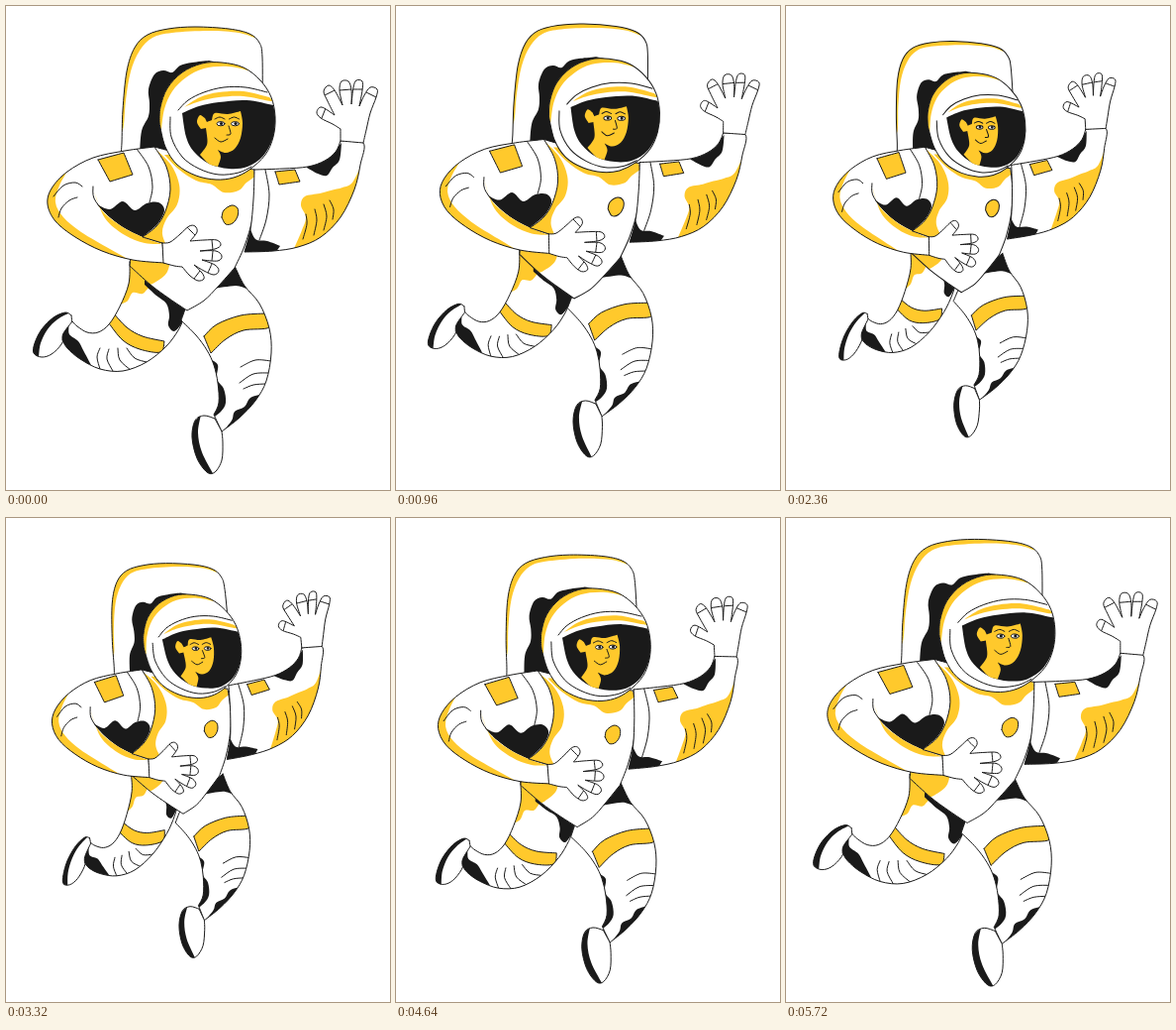
Recreate the animation shown at these times as an HTML page. Size 388 px wide and 488 px high, loop 5760 ms.

```html
<!DOCTYPE html>
<html lang="en">
<head>
<meta charset="utf-8">
<title>Waving astronaut</title>
<style>
  html, body { margin: 0; width: 100%; height: 100%; overflow: hidden; background: #fff; }
  svg { display: block; width: 388px; height: 488px; }
  path, ellipse { vector-effect: non-scaling-stroke; stroke-linejoin: round; stroke-linecap: round; }
  .white { fill: #fff; }
  .gold { fill: #ffc92c; }
  .black { fill: #1a1a1a; }
  .line, .badge { fill: none; stroke: #1a1a1a; stroke-width: 1; }
  .badge { fill: #ffc92c; }
</style>
</head>
<body>
<svg id="stage" viewBox="0 0 388 488"></svg>
<script>
const LOOP = 5760, STEP = 40;
const stage = document.getElementById('stage');
const parts = [];

// The whole body sways once per loop; the sway grows evenly across it.
const sway = {
  cos: (x, y) => [0.085 * x - 0.038 * y - 1.3, 0.062 * y - 12],
  sin: (x, y) => [7 - 0.029 * y, 0.02 * x - 13.5]
};

// Limbs swing further, in proportion to the distance from their joint.
const still = () => [0, 0];
const leftArm = (x, y) => [0.045 * (y - 142), -0.025 * (y - 142)];
const rightArm = x => [-0.02 * (x - 225), 0.07 * (x - 225)];
const leftLeg = x => [0.03 * (x - 125), 0.17 * (x - 125)];
const rightLeg = (x, y) => [0.07 * (y - 290), 0];

function move(swing, x, y, angle) {
  const c = Math.cos(angle) - 1, s = Math.sin(angle);
  const a = sway.cos(x, y), b = sway.sin(x, y), extra = swing(x, y);
  return [x + c * (a[0] + extra[0]) + s * b[0], y + c * (a[1] + extra[1]) + s * b[1]];
}

function matrix(swing, angle) {
  const [ox, oy] = move(swing, 0, 0, angle);
  const [ax, ay] = move(swing, 1, 0, angle);
  const [bx, by] = move(swing, 0, 1, angle);
  return `matrix(${[ax - ox, ay - oy, bx - ox, by - oy, ox, oy].map(n => n.toFixed(5))})`;
}

function add(parent, tag, attrs) {
  const el = document.createElementNS('http://www.w3.org/2000/svg', tag);
  for (const key in attrs) el.setAttribute(key, attrs[key]);
  return parent.appendChild(el);
}

// Smooth curve through points; "|" marks a corner.
function curve(text) {
  let d = '', last;
  for (const run of text.split('|')) {
    const p = run.trim().split(/\s+/).map(s => s.split(',').map(Number));
    if (last) p.unshift(last); else d = 'M' + p[0];
    for (let i = 0; i < p.length - 1; i++) {
      const b = p[i], c = p[i + 1], a = p[i - 1] || b, e = p[i + 2] || c;
      const h1 = [0, 1].map(k => b[k] + (c[k] - a[k]) / 6);
      const h2 = [0, 1].map(k => c[k] - (e[k] - b[k]) / 6);
      d += `C${h1} ${h2} ${c}`;
    }
    last = p[p.length - 1];
  }
  return d;
}

// details: [class, curve] or [class, cx, cy, rx, ry], clipped to the outline
function part(swing, outline, details) {
  const g = add(stage, 'g', {}), id = 'clip' + parts.length, d = curve(outline);
  add(add(g, 'clipPath', { id }), 'path', { d });
  add(g, 'path', { d, class: 'white' });
  const inner = add(g, 'g', { 'clip-path': `url(#${id})` });
  for (const [cls, shape, cy, rx, ry] of details) {
    if (cy) add(inner, 'ellipse', { class: cls, cx: shape, cy, rx, ry });
    else add(inner, 'path', { class: cls, d: curve(shape) });
  }
  add(g, 'path', { d, class: 'line' });
  parts.push({ g, swing });
}

const eye = x => [
  ['white', x, 118.7, 4, 2.1],
  ['line', x, 118.7, 4, 2.1],
  ['black', x + 0.5, 118.5, 1.6, 1.6],
  ['line', `${x - 6},114 ${x - 1},112 ${x + 4},114`]
];

// backpack
part(still, '116,150 117,138 118,105 122,66 130,42 143,29 164,23 191,21 225,23 246,28 256,37 259,52 259,100 | 230,160 | 116,150', [
  ['gold', '110,125 | 118,125 121,95 126,66 135,45 148,32 168,27 205,25 235,27 251,32 | 250,15 | 110,15 | 110,125'],
  ['black', '135,150 137,126 144,111 145,98 144,84 150,69 159,65 168,67 176,60 188,57 205,55 | 230,60 | 230,160 | 135,150']
]);

// left foot
part(leftLeg, '66,312 60,309 48,314 36,326 29,340 28,350 36,354 46,351 56,341 62,328 67,321 | 66,312', [
  ['black', '65,309 | 52,316 42,326 35,340 33,354 | 24,356 | 24,330 | 45,306 | 65,309']
]);

// left leg
part(leftLeg, '125,258 124,280 115,303 104,321 93,329 82,329 72,323 67,318 | 58,330 57,337 | 62,345 75,356 95,366 118,368 142,359 162,343 174,327 180,314 | 183,300 | 150,270 | 125,258', [
  ['gold', '118,255 | 118,285 | 111,300 122,298 128,289 138,290 146,283 158,284 160,270 | 118,255'],
  ['black', '140,281 152,292 162,300 165,312 164,322 170,328 178,320 | 190,300 | 140,270 | 140,281'],
  ['badge', '108,309 122,324 138,333 160,338 | 156,349 135,346 118,337 104,320 | 108,309'],
  ['black', '57,320 63,322 64,331 73,338 78,347 86,362 | 70,360 | 50,335 | 57,320'],
  ['line', '95,366 92,354 95,345'],
  ['line', '108,368 102,356 104,346'],
  ['line', '126,367 115,357 113,345'],
  ['line', '142,359 130,355 122,345']
]);

// right leg
part(rightLeg, '231,262 241,282 256,300 266,325 268,350 263,378 252,398 236,415 218,429 | 210,412 | 215,400 214,380 210,362 203,347 192,332 177,317 | 183,300 | 231,262', [
  ['black', '232,260 | 246,284 232,282 210,285 | 205,270 | 232,260'],
  ['badge', '200,333 213,321 237,312 262,310 | 266,324 240,327 222,336 207,350 | 200,333'],
  ['black', '206,356 214,362 213,376 220,386 222,400 217,409 208,416 | 204,380 | 206,356'],
  ['black', '260,391 247,395 241,404 231,409 228,418 218,430 | 240,432 | 264,395 | 260,391'],
  ['line', '268,358 252,357 237,364'],
  ['line', '267,370 250,371 236,380'],
  ['line', '262,381 250,382 240,386']
]);

// right foot
part(rightLeg, '211,416 200,413 191,418 188,435 193,456 203,470 211,470 218,458 219,440 218,429 | 211,416', [
  ['black', '197,412 | 194,430 198,450 210,473 | 195,475 | 180,430 | 197,412']
]);

// torso
part(still, '150,142 | 180,150 220,160 251,165 | 252,190 249,215 241,242 231,264 | 214,283 200,297 183,307 | 165,295 146,281 125,262 | 130,235 150,200 158,170 | 150,142', [
  ['gold', '140,135 165,158 175,180 173,200 162,215 158,230 165,250 163,268 150,279 140,282 | 115,262 | 120,200 | 140,135'],
  ['gold', '160,150 175,165 192,176 208,180 220,188 235,186 243,178 253,171 | 240,150 | 160,150'],
  ['badge', '218,213 220,206 228,201 234,204 234,212 229,219 222,220 218,213']
]);

// right arm
part(rightArm, '251,165 280,164 305,162 322,156 333,147 338,136 | 361,138 358,160 352,185 338,213 318,233 295,243 270,247 241,248 | 247,225 250,195 251,165', [
  ['gold', '360,158 350,178 340,183 328,186 317,189 302,192 298,201 303,213 299,226 290,247 | 330,245 | 368,190 | 360,158'],
  ['black', '246,222 252,235 264,237 277,242 | 270,252 | 232,252 | 246,222'],
  ['badge', '272,167 | 292,165 | 297,177 | 276,180 | 272,167'],
  ['black', '304,160 | 325,152 339,138 | 337,155 330,163 324,171 315,169 304,163 | 304,160'],
  ['line', '262,165 266,190 263,215 256,236'],
  ['line', '300,235 304,220 303,210'],
  ['line', '311,231 314,216 312,205'],
  ['line', '321,226 324,212 321,200'],
  ['line', '330,215 331,205 327,196']
]);

// left arm
part(leftArm, '150,142 120,146 88,153 62,167 46,184 42,200 50,217 70,233 97,247 128,256 160,259 | 158,239 | 138,233 | 152,222 161,207 166,185 162,162 150,142', [
  ['gold', '66,160 44,181 38,200 48,222 70,237 97,250 130,259 | 105,245 76,228 58,213 50,198 54,181 66,160'],
  ['black', '92,200 105,205 118,197 130,206 142,199 154,198 160,206 153,220 138,233 | 120,224 105,213 92,200'],
  ['gold', '88,184 97,206 118,223 138,233 158,240 | 140,239 120,231 100,214 88,184'],
  ['line', '88,182 89,194 100,208 118,222 138,232 158,239'],
  ['badge', '93,155 | 119,148 | 128,170 | 105,177 | 93,155'],
  ['line', '132,144 144,162 148,182 145,198'],
  ['line', '48,192 58,181 70,178 77,182'],
  ['line', '53,213 56,204 64,196 72,193']
]);

// helmet and face
part(still, '155,118 156,102 163,83 178,67 198,58 218,57 240,62 257,75 268,92 272,112 270,132 262,150 246,165 230,173 212,175 192,171 173,160 161,142 155,118', [
  ['gold', '152,125 152,100 161,80 177,64 200,54 220,53 249,66 | 225,61 200,63 182,72 168,86 160,104 157,124 | 152,125'],
  ['line', '166,112 167,132 178,152 195,164 215,170 235,168 248,162'],
  ['gold', '180,102 196,92 215,87 240,86 266,92 | 268,96 240,91 215,92 196,96 180,102'],
  ['line', '174,105 184,95 200,87 220,82 242,82 264,87'],
  ['black', '178,108 | 195,101 215,97 243,95 270,100 | 272,112 270,132 260,151 244,162 225,164 205,159 190,147 182,132 178,108'],
  ['gold', '197,124 193,117 196,110 201,113 | 203,117 | 208,115 | 211,108 224,109 237,106 | 239,118 237,133 231,144 222,148 214,145 | 217,152 214,162 | 205,159 196,150 | 203,140 203,130 | 202,123 | 197,124'],
  ...eye(217),
  ...eye(231.5),
  ['line', '225,121 227,129 223,130'],
  ['line', '211,133 217,137 224,134']
]);

// left hand
part(leftArm, '158,239 166,238 176,230 185,222 191,222 193,228 186,237 | 200,236 213,236 217,241 211,245 196,247 | 212,247 218,252 214,257 198,256 | 211,261 215,267 210,271 200,267 190,261 | 198,269 200,275 194,277 186,272 178,263 | 170,262 159,259 | 158,239', [
  ['line', '183,223 191,231'],
  ['line', '208,236 209,246'],
  ['line', '209,247 208,257'],
  ['line', '208,260 204,269'],
  ['line', '196,267 190,275']
]);

// right hand
part(rightArm, '338,136 338,124 | 330,119 318,113 314,107 319,102 332,110 | 325,96 321,86 326,80 332,85 340,100 | 337,85 339,76 346,76 349,85 349,99 | 351,82 354,75 360,76 360,85 357,101 | 362,90 368,82 375,84 374,92 368,108 364,125 361,138 | 338,136', [
  ['line', '323,103 319,113'],
  ['line', '322,90 332,85'],
  ['line', '337,85 349,84'],
  ['line', '350,84 361,84'],
  ['line', '364,87 374,92']
]);

function draw(t) {
  const angle = t / LOOP * 2 * Math.PI;
  for (const { g, swing } of parts) g.setAttribute('transform', matrix(swing, angle));
}

const start = performance.now();
function tick() {
  const t = (performance.now() - start) % LOOP;
  draw(Math.floor(t / STEP) * STEP);
  requestAnimationFrame(tick);
}
draw(0);
requestAnimationFrame(tick);
</script>
</body>
</html>
```
